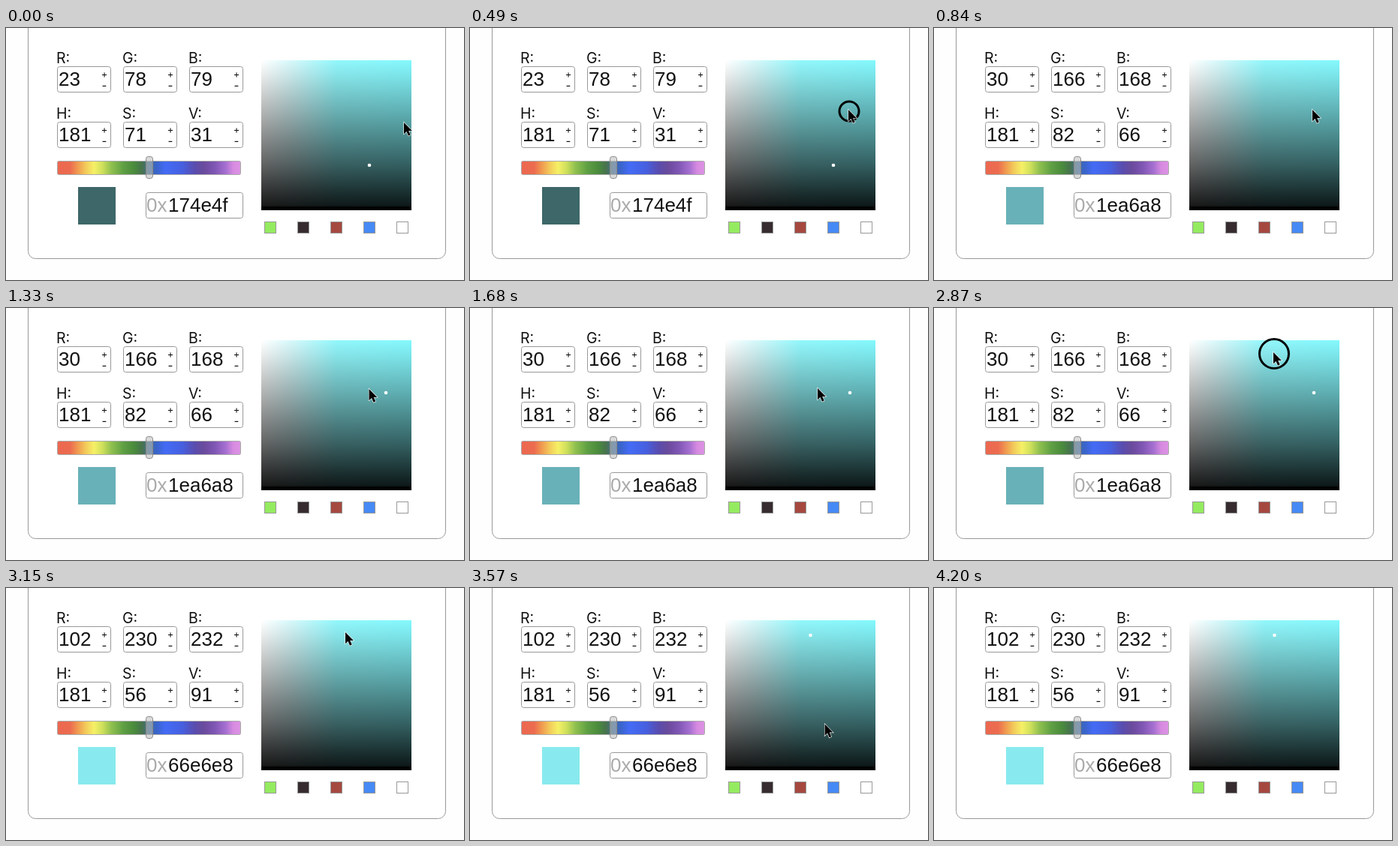
Animation, 610 px wide and 336 px high, one loop 4760 ms. Source, as an HTML page:

```html
<!DOCTYPE html>
<html>
<head>
<meta charset="utf-8">
<style>
html, body { margin: 0; width: 100%; height: 100%; overflow: hidden; background: #fefefe; }
svg { display: block; }
text { font: 26px "Liberation Sans", Arial, sans-serif; fill: #111; }
text.label { font: 19.5px Inter, sans-serif; }
text.step { font: 15px Inter, sans-serif; }
.box { fill: #fff; stroke: #999; }
</style>
</head>
<body>
<svg id="stage" width="610" height="336">
  <defs>
    <linearGradient id="sat">
      <stop offset="0" stop-color="#fff"/>
      <stop offset=".2" stop-color="#d6f8fa"/>
      <stop offset=".5" stop-color="#92f7fb"/>
      <stop offset="1" stop-color="#84f8fd"/>
    </linearGradient>
    <linearGradient id="val" x2="0" y2="1">
      <stop offset="0" stop-opacity="0"/>
      <stop offset=".09" stop-opacity=".07"/>
      <stop offset=".34" stop-opacity=".29"/>
      <stop offset=".69" stop-opacity=".61"/>
      <stop offset=".97" stop-opacity=".9"/>
      <stop offset=".98" stop-opacity="1"/>
    </linearGradient>
    <linearGradient id="hue"></linearGradient>
  </defs>
  <rect class="box" x="29.5" y="-30" width="556" height="337.5" rx="10"/>
  <g id="fields"></g>
  <rect x="68.5" y="177.5" width="244" height="18" rx="2" fill="url(#hue)" stroke="#aaa"/>
  <rect x="186.5" y="171.5" width="9" height="29" rx="3" fill="#bbb" fill-opacity=".55" stroke="#888"/>
  <rect id="swatch" x="96" y="212" width="50" height="50"/>
  <rect class="box" x="186.5" y="219.5" width="129" height="34" rx="3"/>
  <text x="187" y="245" style="fill:#aaa">0x</text>
  <text id="hex" x="216" y="245"></text>
  <rect x="340" y="43" width="200" height="200" fill="url(#sat)"/>
  <rect x="340" y="43" width="200" height="200" fill="url(#val)"/>
  <g id="presets"></g>
  <circle id="dot" r="2.3" fill="#fff"/>
  <circle id="ring" fill="none" stroke="#000" stroke-width="3"/>
  <path id="cursor" d="M0 0V15.2L3.5 12L6 17.8L8.7 16.6L6.2 11H10.9Z" stroke="#fff" stroke-width="1.2" paint-order="stroke"/>
</svg>
<script>
const LOOP = 4760, STEP = 70;
const $ = id => document.getElementById(id);

const hues = [[0, "#ec6850"], [.07, "#ec6c50"], [.11, "#f0994f"], [.155, "#f3cb5c"], [.2, "#f5f066"],
  [.245, "#d0e05c"], [.295, "#8fc04f"], [.36, "#5f9f44"], [.42, "#4a8a3c"], [.465, "#47714f"],
  [.5, "#44729a"], [.54, "#3b63c8"], [.59, "#446bf5"], [.68, "#4660e0"], [.75, "#5a4cae"],
  [.8, "#6a4a9c"], [.86, "#8057b5"], [.92, "#a670d2"], [.96, "#d78be0"], [1, "#dc93e4"]];
$("hue").innerHTML = hues.map(([o, c]) => `<stop offset="${o}" stop-color="${c}"/>`).join("");

$("fields").innerHTML = [..."RGBHSV"].map((name, i) => {
  const x = 68 + i % 3 * 88, y = i < 3 ? 51 : 125;
  return `<text class="label" x="${x - 1}" y="${y - 4}">${name}:</text>
    <rect class="box" x="${x + .5}" y="${y + .5}" width="71" height="34" rx="3"/>
    <text class="value" x="${x + 2}" y="${y + 26}"></text>
    <text class="step" x="${x + 63}" y="${y + 15}" text-anchor="middle" style="font-size:13px">+</text>
    <text class="step" x="${x + 63}" y="${y + 31}" text-anchor="middle">-</text>`;
}).join("");

$("presets").innerHTML = ["#94eb5f", "#362c30", "#a5483f", "#468af5", "#fff"].map((c, i) =>
  `<rect x="${344.5 + i * 44}" y="258.5" width="15" height="15" fill="${c}" stroke="#999"/>`).join("");

const states = [
  { from: 0, values: [23, 78, 79, 181, 71, 31], hex: "174e4f", shade: "#3d6768", dot: [484, 183] },
  { from: 630, values: [30, 166, 168, 181, 82, 66], hex: "1ea6a8", shade: "#69b1b8", dot: [506, 113] },
  { from: 2940, values: [102, 230, 232, 181, 56, 91], hex: "66e6e8", shade: "#88eaee", dot: [453.5, 63] }
];
const clicks = [420, 2730];

// time, x, y of the pointer tip
const path = [[0, 530, 126], [280, 504, 109], [980, 504, 109], [1680, 463, 107],
  [2100, 450, 83], [2450, 452, 59], [3360, 452, 59], [3850, 500, 345]];

function pointer(t) {
  const i = path.findIndex(p => p[0] > t);
  if (i < 0) return [500, 345];
  const [t0, x0, y0] = path[i - 1], [t1, x1, y1] = path[i];
  const k = (t - t0) / (t1 - t0);
  return [x0 + (x1 - x0) * k, y0 + (y1 - y0) * k];
}

function place(circle, x, y) {
  circle.setAttribute("cx", x);
  circle.setAttribute("cy", y);
}

const values = document.querySelectorAll(".value");

function draw(now) {
  const t = Math.floor(now % LOOP / STEP) * STEP;
  const state = states.filter(s => s.from <= t).pop();
  values.forEach((v, i) => v.textContent = state.values[i]);
  $("hex").textContent = state.hex;
  $("swatch").setAttribute("fill", state.shade);
  place($("dot"), ...state.dot);

  const [x, y] = pointer(t);
  $("cursor").setAttribute("transform", `translate(${x} ${y})`);
  const start = clicks.find(c => t >= c && t < c + 3 * STEP);
  $("ring").style.display = start === undefined ? "none" : "";
  if (start !== undefined) {
    place($("ring"), x + 1, y + 2);
    $("ring").setAttribute("r", 19.5 * ((t - start) / STEP + 1) / 3);
  }
}

const begin = performance.now();
function tick() {
  draw(performance.now() - begin);
  requestAnimationFrame(tick);
}
tick();
</script>
</body>
</html>
```
